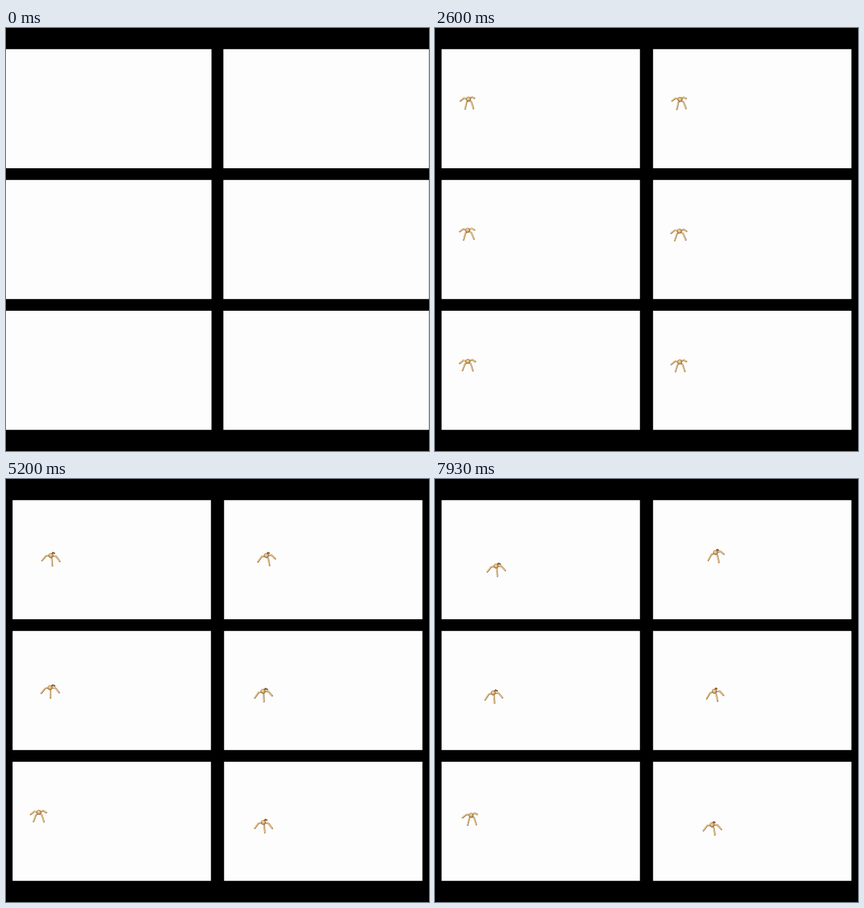
Recreate the animation shown at these times as an HTML page with a canvas. Size 748 px wide and 748 px high, loop 8 s.

```html
<!DOCTYPE html>
<html>
<head>
<meta charset="utf-8">
<style>
html, body { margin: 0; width: 100%; height: 100%; overflow: hidden; background: #000; }
canvas { display: block; }
</style>
</head>
<body>
<canvas id="stage" width="748" height="748"></canvas>
<script>
const ctx = document.getElementById('stage').getContext('2d');
const LOOP = 8000, FPS = 15, CUT = 30;
const ROW = 231.3, COL = 374;

// Waypoints inside the panel, reached at these ages (in steps)
const START = [55, 124], AGES = [0, 34, 64, 89];

// turn: how far the walker yaws in the end, in degrees
const walkers = [
  { label: 18, turn: 58, path: [[71, 131], [89, 140], [108, 154]] },
  { label: 59, turn: 82, path: [[71, 133], [104, 138], [122, 130]] },
  { label: 58, turn: 62, path: [[65.5, 133], [92, 143], [103, 147]] },
  { label: 35, turn: 72, path: [[67, 139], [96, 150], [120, 144]] },
  { label: 71, turn: 20, path: [[67, 135]], restarts: [69, 94] },
  { label: 79, turn: 62, path: [[69.5, 139], [94.5, 151], [116, 149]] }
];

// Ground direction of each leg (90 faces the viewer) and its share of the turn
const legs = [
  { angle: 320, share: 0.5 },
  { angle: 208, share: 0.8 },
  { angle: 60, share: 1.05 },
  { angle: 124, share: 0.8 }
];

const mix = (a, b, u) => a + (b - a) * u;

function eachPanel(paint) {
  walkers.forEach((walker, i) => {
    ctx.save();
    ctx.translate((i % 2) * COL, (i >> 1) * ROW);
    paint(walker, i);
    ctx.restore();
  });
}

function drawPanel(i, intro) {
  ctx.fillStyle = '#fdfdfd';
  const x = intro ? (i % 2) * 10.4 : 11.6;
  ctx.fillRect(x, 37.4, intro ? 363.4 : 350.8, 210.6);
}

// Letters sit on a half-em grid
function drawLabel(label, alpha) {
  ctx.globalAlpha = alpha;
  ctx.fillStyle = '#7a7a7a';
  ctx.font = '27px "Liberation Serif", serif';
  ctx.textAlign = 'center';
  [...`class: ${label}`].forEach((ch, k) => ctx.fillText(ch, 135 + k * 13.4, 150.5));
}

function strokeLeg(points, width, color, shift) {
  ctx.lineWidth = width;
  ctx.strokeStyle = color;
  ctx.beginPath();
  for (const [x, y] of points) ctx.lineTo(x + shift, y + shift);
  ctx.stroke();
}

function drawLeg(deg) {
  const c = Math.cos(deg * Math.PI / 180), s = Math.sin(deg * Math.PI / 180);
  const drop = 8 + 3 * Math.min(0, s);
  const points = [[0, 0], [9 * c, 5.5 * s], [16 * c, 10 * s + drop]];
  strokeLeg(points, 2.8, '#80603a', 0.2);
  strokeLeg(points, 1.9, s < -0.8 ? '#8a683f' : '#e2b878', -0.1);
  if (s > -0.8) strokeLeg(points, 0.8, '#f8deac', -0.3);
}

function drawBody() {
  const shade = ctx.createRadialGradient(-0.8, -1.4, 0.4, 0, 0, 4.4);
  shade.addColorStop(0, '#f8d8a0');
  shade.addColorStop(0.6, '#d8a868');
  shade.addColorStop(1, '#6f4d28');
  ctx.fillStyle = shade;
  ctx.beginPath();
  ctx.arc(0, 0, 4.3, 0, 7);
  ctx.fill();
}

function position(path, age) {
  const points = [START, ...path];
  let k = 0;
  while (k < points.length - 2 && age > AGES[k + 1]) k++;
  const u = (age - AGES[k]) / (AGES[k + 1] - AGES[k]);
  return points[k].map((v, axis) => mix(v, points[k + 1][axis], u));
}

function drawWalker({ turn, path, restarts = [] }, i, step) {
  const age = step - Math.max(CUT, ...restarts.filter(r => r < step));
  const yaw = turn * age ** 2 / (age ** 2 + 25 ** 2);
  ctx.translate(...position(path, age));
  ctx.lineCap = ctx.lineJoin = 'round';
  legs.forEach(({ angle, share }, n) => {
    drawLeg(angle - share * yaw + 6 * Math.sin(age * 0.5 + n * 2 + i));
  });
  drawBody();
}

let begin;
function tick(now) {
  begin ??= now;
  const step = Math.floor(((now - begin) % LOOP) / 1000 * FPS + 0.1) % 120;
  const intro = step < CUT;
  ctx.fillStyle = '#000';
  ctx.fillRect(0, 0, 748, 748);
  eachPanel((walker, i) => {
    drawPanel(i, intro);
    if (intro) drawLabel(walker.label, Math.min(1, step / 10));
    else drawWalker(walker, i, step);
  });
  requestAnimationFrame(tick);
}
requestAnimationFrame(tick);
</script>
</body>
</html>
```
